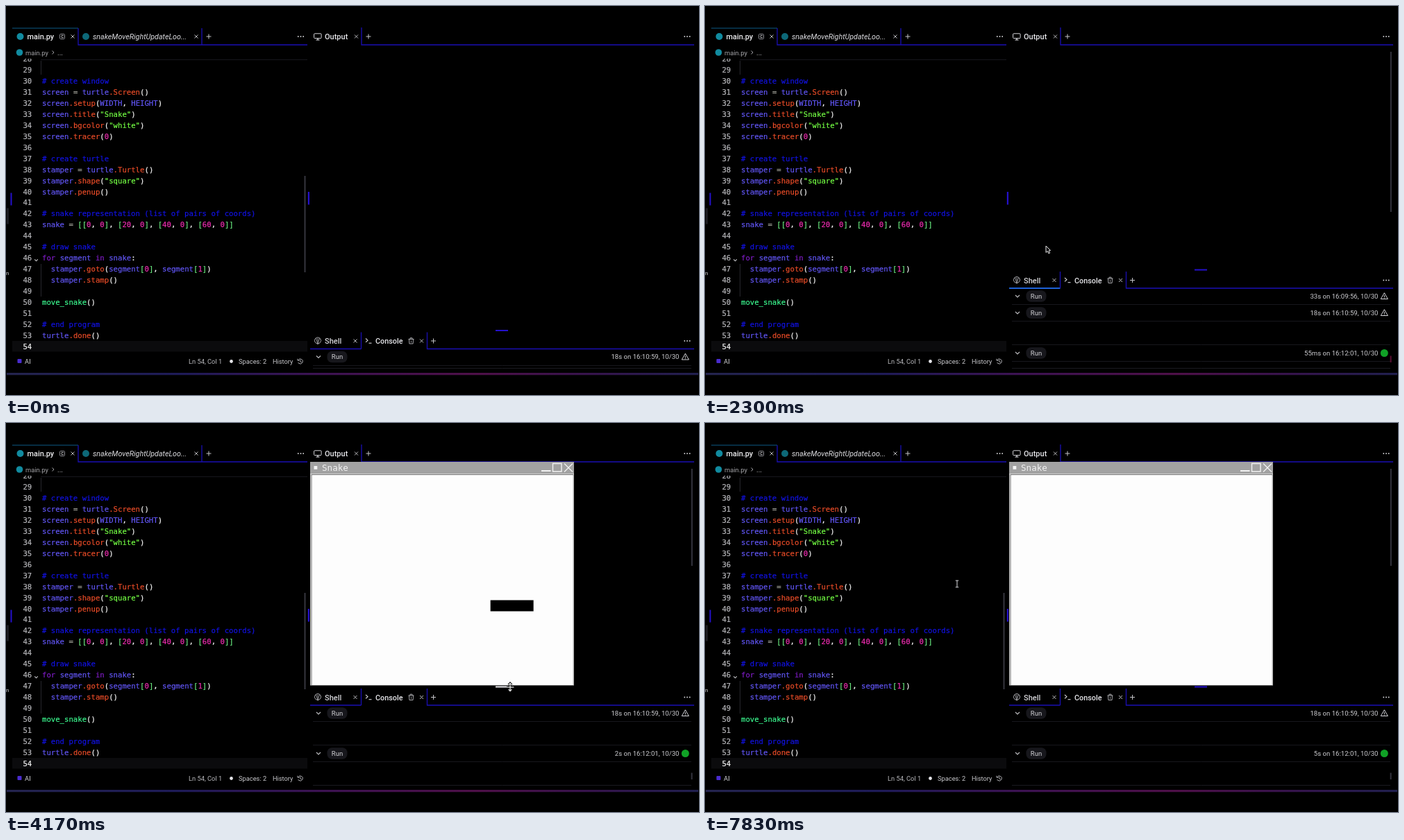
An HTML page with a canvas for the animation above (7.86 s loop, 998 by 561 pixels).

```html
<!DOCTYPE html>
<html lang="en">
<head>
<meta charset="utf-8">
<title>Snake editor</title>
<style>
html, body { margin: 0; width: 100%; height: 100%; overflow: hidden; background: #000; }
canvas { display: block; }
</style>
</head>
<body>
<canvas id="stage" width="998" height="561"></canvas>
<script>
const g = document.getElementById('stage').getContext('2d');
const LOOP = 7860;
const UI = 'Roboto, "Noto Sans", sans-serif';
const MONO = '"DejaVu Sans Mono", "Noto Sans Mono", monospace';
const CODE_SIZE = 10.65, CHAR = 6.412, LINE = 15.96;
const BLUE = '#1a0fb4', BAR = '#2410cc', TEXT = '#d0d0d4', TEAL = '#118ba0';

const CODE = `

# create window
screen = turtle.Screen()
screen.setup(WIDTH, HEIGHT)
screen.title("Snake")
screen.bgcolor("white")
screen.tracer(0)

# create turtle
stamper = turtle.Turtle()
stamper.shape("square")
stamper.penup()

# snake representation (list of pairs of coords)
snake = [[0, 0], [20, 0], [40, 0], [60, 0]]

# draw snake
for segment in snake:
  stamper.goto(segment[0], segment[1])
  stamper.stamp()

move_snake()

# end program
turtle.done()
`.split('\n');

const RULES = [
  [/^#.*/, '#1212e4'],
  [/^"[^"]*"/, '#74ff44'],
  [/^(for|in)\b/, '#7e1cc4'],
  [/^move_snake/, '#3cfa90'],
  [/^\d+/, '#ee2cb0'],
  [/^\.[A-Za-z]+/, '#ea4c28'],
  [/^[A-Za-z_]+/, '#6256f6'],
  [/^[\[\]]/, '#6aec80'],
  [/^=/, '#b4b4aa'],
  [/^./, '#fafafa']
];

// Timeline in ms
const TIP_ON = 800, TIP_OFF = 1650, PANEL_UP = 1950, RUN = 2150, WINDOW = 2480;
const MOVE_START = 2260, MOVE_STEP = 370;
const PATH = [
  [250, 405, 14], [550, 405, 26], [1650, 405, 26], [2300, 491, 351],
  [2950, 728, 380], [3600, 728, 380], [4100, 726, 381],
  [7250, 726, 381], [7800, 363, 232]
];

function rect(x, y, w, h, color) {
  g.fillStyle = color;
  g.fillRect(x, y, w, h);
}

function line(color, width, ...pts) {
  g.strokeStyle = color;
  g.lineWidth = width;
  g.beginPath();
  for (let i = 0; i < pts.length; i += 2) g.lineTo(pts[i], pts[i + 1]);
  g.stroke();
}

function round(x, y, w, h, r, fill, stroke) {
  g.beginPath();
  g.roundRect(x, y, w, h, r);
  if (fill) { g.fillStyle = fill; g.fill(); }
  if (stroke) { g.strokeStyle = stroke; g.lineWidth = 1; g.stroke(); }
}

function dot(x, y, r, color) {
  g.fillStyle = color;
  g.beginPath();
  g.arc(x, y, r, 0, 7);
  g.fill();
}

function text(s, x, y, size, color = TEXT, style = '', align = 'left', family = UI) {
  g.font = `${style} ${size}px ${family}`;
  g.fillStyle = color;
  g.textAlign = align;
  g.fillText(s, x, y);
}

// Code is slightly heavier than the regular weight
function mono(s, x, y, color, align = 'left') {
  text(s, x, y, CODE_SIZE, color, '', align, MONO);
  g.strokeStyle = color;
  g.lineWidth = 0.2;
  g.strokeText(s, x, y);
}

function cross(x, y) {
  line('#b8b8bc', 1, x - 2.5, y - 2.5, x + 2.5, y + 2.5);
  line('#b8b8bc', 1, x + 2.5, y - 2.5, x - 2.5, y + 2.5);
}

function plus(x, y) {
  line('#c4c4c8', 1, x - 3.5, y, x + 3.5, y);
  line('#c4c4c8', 1, x, y - 3.5, x, y + 3.5);
}

function more(x, y) {
  for (const d of [-3.7, 0, 3.7]) dot(x + d, y, 0.95, '#d0d0d4');
}

function chevron(x, y, r = 3) {
  line('#c0c0c4', 1.1, x - r, y - r / 2, x, y + r / 2, x + r, y - r / 2);
}

function clipTo(x, y, w, h, draw) {
  g.save();
  g.beginPath();
  g.rect(x, y, w, h);
  g.clip();
  draw();
  g.restore();
}

function codeLine(src, y) {
  let col = 0;
  while (col < src.length) {
    const rest = src.slice(col);
    const [re, color] = RULES.find(([r]) => r.test(rest));
    const token = rest.match(re)[0];
    mono(token, 52 + col * CHAR, y, color);
    col += token.length;
  }
}

function editor(t) {
  line('#0c5a86', 1, 9, 32, 104, 32);
  line(BLUE, 1.3, 104, 32, 104, 56, 434, 56);
  line(BLUE, 1.3, 282, 32, 282, 56);
  dot(20.5, 44, 5, TEAL);
  text('main.py', 30.5, 48, 10.9, '#f0f0f2', '500');
  round(77.5, 40.5, 7, 7, 1, null, '#8c8c92');
  line('#b0b0b4', 0.9, 83, 42.5, 80, 42.5, 80, 45.5, 83, 45.5);
  cross(96, 44);
  dot(115, 44, 5, '#0d6878');
  text('snakeMoveRightUpdateLoo...', 125, 48, 10.7, '#dcdce0', 'italic');
  cross(274, 44);
  plus(292, 44);
  more(424.5, 44);

  dot(19.5, 67, 4.8, TEAL);
  text('main.py', 28, 70.5, 9.4, '#a4a4a8');
  line('#a4a4a8', 1, 66.5, 64.5, 69, 67, 66.5, 69.5);
  text('...', 74, 70.5, 10, '#b8b8bc');

  rect(9, 483, 425, 15.5, '#0b0b0d');
  line('#17171d', 1, 50, 77.5, 434, 77.5);
  line('#26262c', 1, 50.5, 79, 50.5, 99);
  line('#26262c', 1, 50.5, 372, 50.5, 419);
  clipTo(9, 76, 425, 424, () => {
    CODE.forEach((src, i) => {
      const n = 28 + i, y = 111.9 + (n - 30) * LINE;
      mono(n, 37.2, y, n === 54 ? '#f8f8f8' : '#b8b8bc', 'right');
      codeLine(src, y);
    });
  });
  chevron(43.5, 366.5, 2.3);

  const fade = t < 1000 ? Math.min(1, (1000 - t) / 400) : t > 2600 ? 1 : 0;
  g.globalAlpha = fade;
  rect(429.5, 245, 2, 139, '#36363f');
  g.globalAlpha = 1;

  round(16.5, 509, 6, 6, 1, '#4a2cd0');
  text('AI', 27, 516, 9.5, TEXT);
  text('Ln 54, Col 1', 263, 516, 9.3, '#bcbcc0');
  dot(324.5, 512.5, 2.4, '#e4e4e8');
  text('Spaces: 2', 335, 516, 9.3, '#cacace');
  text('History', 384, 516, 9.2, '#cacace');
  g.strokeStyle = '#b4b4b8';
  g.lineWidth = 1;
  g.beginPath();
  g.arc(423.8, 512.5, 3.5, -2.6, 2.7);
  g.stroke();
  line('#b4b4b8', 1, 423.8, 510.5, 423.8, 512.8, 425.6, 513.6);
  line('#b4b4b8', 1, 419.8, 508.8, 420.2, 511.3, 422.6, 511.2);
}

function frameMarks() {
  rect(6.5, 269.5, 2, 18, BAR);
  rect(434.8, 268, 2.2, 18.5, BAR);
  rect(1, 291.5, 3, 23, '#1b1b20');
  text('n', 0, 388, 8, '#c8c8cc');
  const grad = g.createLinearGradient(0, 0, 998, 0);
  [[0, '#24244e'], [0.25, '#1e1b58'], [0.45, '#3c1352'], [0.68, '#4e1048'], [0.85, '#35144c'], [1, '#20204e']]
    .forEach(([p, c]) => grad.addColorStop(p, c));
  rect(1, 529, 996, 3.2, grad);
}

function outputTabs(t) {
  round(443.6, 39.8, 10.5, 6.8, 1, null, '#d4d4d8');
  line('#d4d4d8', 1.1, 446.5, 49, 451.5, 49);
  line('#d4d4d8', 1.4, 449, 46.5, 449, 49);
  text('Output', 459, 48, 11, '#e4e4e8', '500');
  cross(504.5, 44);
  plus(522, 44);
  more(981, 44);
  line(BLUE, 1.3, 512, 31, 512, 56, 991, 56);
  if (t >= PANEL_UP) rect(986.8, 66, 2, t < WINDOW ? 231 : 140, '#34343e');
}

function shellIcon(x, y) {
  g.strokeStyle = '#a8a8ac';
  g.lineWidth = 1;
  g.beginPath();
  g.arc(x, y - 0.5, 4.5, 2.4, 7.02);
  g.lineTo(x, y + 4.5);
  g.closePath();
  g.stroke();
  for (const d of [-2.6, 0, 2.6]) line('#a8a8ac', 0.8, x, y + 4.5, x + d, y - 4);
}

function trash(x, y) {
  line('#a8a8ac', 1, x - 4, y - 2.5, x + 4, y - 2.5);
  line('#a8a8ac', 1, x - 1.5, y - 2.5, x - 1.5, y - 4.3, x + 1.5, y - 4.3, x + 1.5, y - 2.5);
  line('#a8a8ac', 1, x - 3, y - 2.5, x - 2.6, y + 4, x + 2.6, y + 4, x + 3, y - 2.5);
  line('#a8a8ac', 0.8, x, y - 0.5, x, y + 2.5);
}

function runRow(y, label, live) {
  chevron(450, y);
  round(462.5, y - 8.2, 29, 16.4, 7, '#17171c');
  text('Run', 477, y + 3.4, 9.5, '#d0d0d4', '', 'center');
  text(label, 969.5, y + 3.4, 9.6, '#ccccd0', '', 'right');
  if (live) {
    dot(978.3, y, 5.5, '#10a226');
  } else {
    line('#d0d0d4', 1, 978.3, y - 4.7, 983.4, y + 4, 973.2, y + 4, 978.3, y - 4.7, 979, y - 3.6);
    line('#d0d0d4', 1, 978.3, y - 1.5, 978.3, y + 1.5);
    rect(977.8, y + 2.2, 1, 1, '#d0d0d4');
  }
}

function consolePanel(t, hover) {
  const up = t >= PANEL_UP;
  const top = up ? 380.5 : 468;
  const mid = top + 15, edge = top + 26.5;
  rect(705, top - 1, 18, 2, hover ? '#f0f0f4' : BAR);
  shellIcon(449, mid);
  text('Shell', 459, mid + 4, 11, '#d4d4d8', '500');
  cross(503, mid);
  line('#d4d4d8', 1.1, 518, mid - 3.5, 521, mid - 0.8, 518, mid + 1.9);
  line('#d4d4d8', 1.1, 522.5, mid + 3.2, 526.5, mid + 3.2);
  text('Console', 532, mid + 4, 10.8, '#e8e8ec', '500');
  trash(583.5, mid);
  cross(598.5, mid);
  plus(615.5, mid);
  more(981, mid);
  const loading = up && t < WINDOW;
  line(loading ? '#1d62d8' : BLUE, loading ? 2 : 1.3, 438, edge, 511.5, edge);
  line(BLUE, 1.3, 511.5, edge - 24, 511.5, edge);
  line(BLUE, 1.3, 606.5, edge - 24, 606.5, edge, 991, edge);

  clipTo(438, edge + 1, 554, 522 - edge, () => {
    const rule = y => line('#17171d', 1, 442, y + 0.5, 987, y + 0.5);
    if (!up) {
      runRow(506, '18s on 16:10:59, 10/30');
      rule(518);
      return;
    }
    const shift = t < WINDOW ? 24 : 0;
    if (shift) {
      runRow(418.5, '33s on 16:09:56, 10/30');
      rule(430);
    }
    runRow(418.5 + shift, '18s on 16:10:59, 10/30');
    rule(430 + shift);
    rule(464 + shift);
    const secs = Math.floor((t - RUN) / 1000);
    runRow(476.5 + shift, `${secs < 1 ? '55ms' : secs + 's'} on 16:12:01, 10/30`, true);
    rule(488 + shift);
    rect(986.6, 504.5, 2, 9.5, shift ? '#5c1034' : '#34343e');
  });
  line('#1b1b21', 1, 442, 522.5, 987, 522.5);
}

function snakeWindow(t) {
  rect(438, 56, 380, 322.5, '#b4b4b4');
  rect(438, 56, 380, 17, '#a2a2a2');
  rect(438, 73, 380, 1, '#d4d4d4');
  rect(440, 74, 377, 1.2, '#777');
  rect(441, 75, 375.5, 303, '#fdfdfd');
  rect(443.5, 62, 4.8, 4.8, '#f4f4f4');
  text('Snake', 455, 69, 12.6, '#f2f2f2', '', 'left', MONO);
  rect(771, 68, 13.5, 2, '#f2f2f2');
  line('#f2f2f2', 1.4, 787.5, 58.5, 800, 58.5, 800, 70, 787.5, 70, 787.5, 57.8);
  line('#f2f2f2', 1.3, 804, 58.5, 816, 70.5);
  line('#f2f2f2', 1.3, 816, 58.5, 804, 70.5);
  const step = Math.floor((t - MOVE_START) / MOVE_STEP);
  clipTo(441, 75, 375.5, 303, () => rect(621.8 + 15.17 * step, 255.5, 62, 16, '#000'));
}

function tooltip() {
  g.fillStyle = '#35353d';
  g.beginPath();
  g.moveTo(407, 39);
  g.lineTo(413.5, 33.5);
  g.lineTo(420, 39);
  g.fill();
  round(385, 38.5, 57, 20.5, 4, '#35353d', '#29275c');
  round(388.5, 42.5, 19, 13.5, 3, '#25252b', '#50505a');
  round(411.5, 42.5, 28, 13.5, 3, '#25252b', '#50505a');
  text('Ctrl', 398, 52.5, 9.3, '#dcdce0', '', 'center');
  text('Enter', 425.5, 52.5, 9.3, '#dcdce0', '', 'center');
}

function mouse(t) {
  if (t < PATH[0][0]) return null;
  let i = PATH.findIndex(p => p[0] > t);
  if (i < 0) i = PATH.length;
  const a = PATH[i - 1], b = PATH[i] || a;
  let u = b === a ? 0 : (t - a[0]) / (b[0] - a[0]);
  u = u * u * (3 - 2 * u);
  return [a[1] + (b[1] - a[1]) * u, a[2] + (b[2] - a[2]) * u];
}

function shape(x, y, pts) {
  g.beginPath();
  for (let i = 0; i < pts.length; i += 2) g.lineTo(x + pts[i], y + pts[i + 1]);
  g.closePath();
  g.strokeStyle = '#e8e8e8';
  g.lineWidth = 1;
  g.fillStyle = '#08080a';
  g.fill();
  g.stroke();
}

function resizeCursor(x, y) {
  for (const [color, w] of [['#000', 3], ['#f4f4f4', 1.2]]) {
    line(color, w, x - 5, y, x + 5.5, y);
    line(color, w, x, y - 5.5, x, y + 5.5);
    line(color, w, x - 2.3, y - 3.2, x, y - 5.7, x + 2.3, y - 3.2);
    line(color, w, x - 2.3, y + 3.2, x, y + 5.7, x + 2.3, y + 3.2);
  }
}

function cursor(x, y, resizing) {
  if (y <= 33) {
    clipTo(390, 26, 40, 30, () => {
      g.fillStyle = '#f4f4f4';
      g.beginPath();
      g.moveTo(x - 5, y - 8);
      g.lineTo(x - 5, y + 1.5);
      g.quadraticCurveTo(x - 3, y + 6, x, y + 6);
      g.quadraticCurveTo(x + 4, y + 6, x + 5.5, y + 1);
      g.lineTo(x + 5.5, y - 8);
      g.fill();
    });
  } else if (resizing) {
    resizeCursor(x, y);
  } else if (x < 430 && y > 78) {
    line('#dcdce0', 1, x, y - 4.5, x, y + 4.5);
    line('#dcdce0', 1, x - 2.2, y - 4.8, x + 2.2, y - 4.8);
    line('#dcdce0', 1, x - 2.2, y + 4.8, x + 2.2, y + 4.8);
  } else {
    shape(x, y - 5, [0, 0, 0, 9.5, 2.2, 7.5, 4, 11, 5.6, 10.2, 4, 7, 6.6, 6.6]);
  }
}

function draw() {
  const t = performance.now() % LOOP;
  const m = mouse(t);
  const resizing = m && t > 2600 && Math.abs(m[1] - 380.5) < 4;
  rect(0, 0, 998, 561, '#000');
  g.textBaseline = 'alphabetic';
  frameMarks();
  editor(t);
  outputTabs(t);
  if (t >= WINDOW) snakeWindow(t);
  consolePanel(t, resizing);
  if (t >= TIP_ON && t < TIP_OFF) tooltip();
  if (m) cursor(m[0], m[1], resizing);
  requestAnimationFrame(draw);
}
draw();
</script>
</body>
</html>
```
